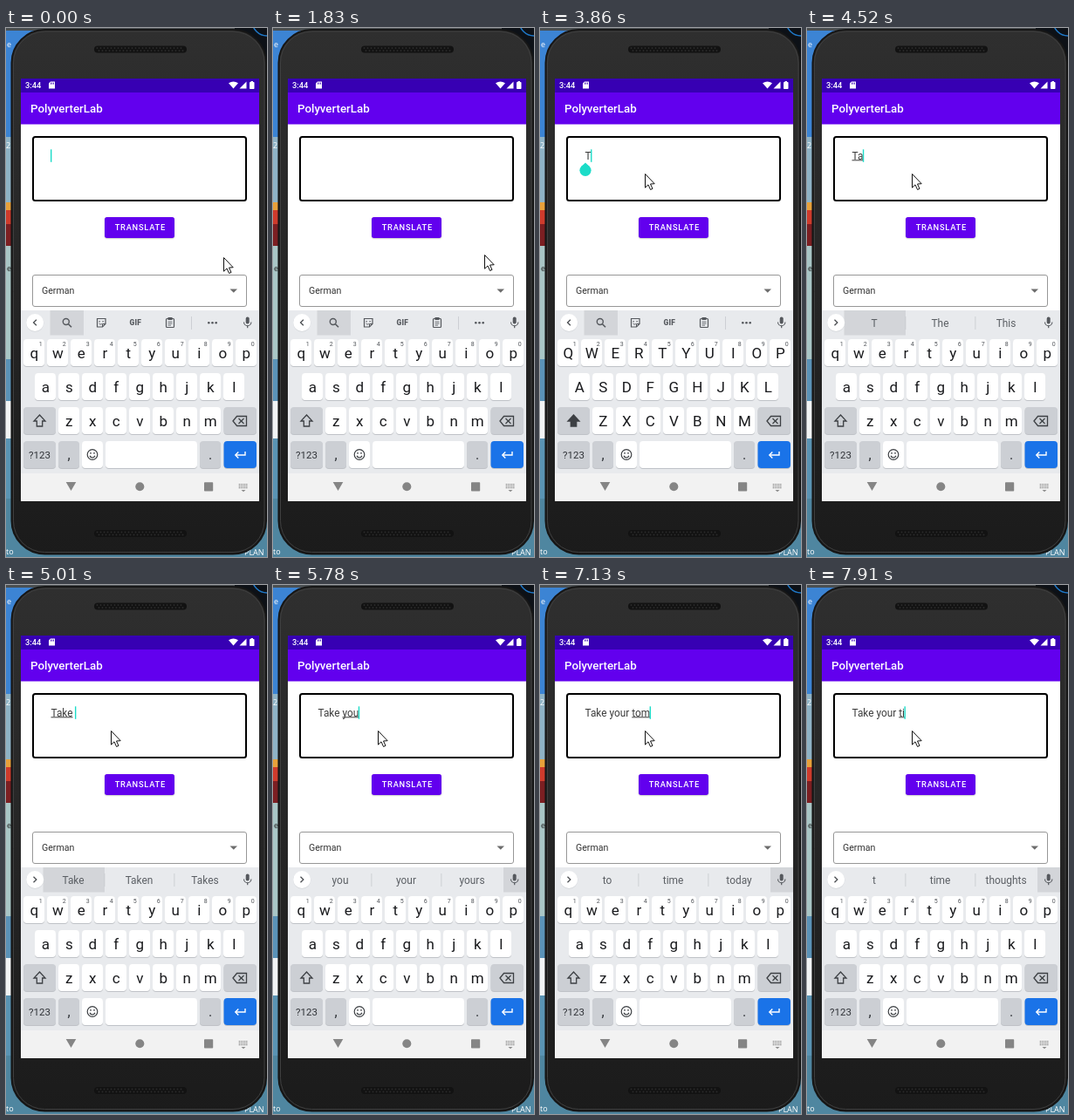
An HTML page with a canvas for the animation above (8 s loop, 299 px wide and 607 px high).

```html
<!DOCTYPE html>
<html lang="en">
<head>
<meta charset="utf-8">
<title>Typing on a phone</title>
<style>
html, body { margin: 0; width: 100%; height: 100%; overflow: hidden; background: #242424; }
canvas { display: block; width: 299px; height: 607px; }
</style>
</head>
<body>
<canvas id="stage"></canvas>
<script>
const W = 299, H = 607, LOOP = 8000;
const canvas = document.getElementById('stage');
const ctx = canvas.getContext('2d');
const dpr = window.devicePixelRatio || 1;
canvas.width = W * dpr;
canvas.height = H * dpr;

const TEAL = '#1cdcc8', PURPLE = '#6200ee', ICON = '#55585d', PRESSED = '#d3d5d9';
const INPUT_FONT = '11.85px Roboto, sans-serif';

// Timelines: each entry holds from its time until the next one.
const typed = [
  [0, ''], [3860, 'T'], [4520, 'Ta'], [4770, 'Tak'], [4890, 'Take'], [5010, 'Take '],
  [5260, 'Take y'], [5380, 'Take yo'], [5500, 'Take you'], [6280, 'Take your'],
  [6400, 'Take your '], [6770, 'Take your t'], [6890, 'Take your to'],
  [7010, 'Take your tom'], [7280, 'Take your to'], [7400, 'Take your t'], [7910, 'Take your ti']
];
const composing = [
  [0, ''], [4000, 'T'], [4520, 'Ta'], [4770, 'Tak'], [4890, 'Take'], [5260, ''],
  [5780, 'you'], [6400, 'your'], [6770, ''], [7130, 'tom'], [7280, 'to'], [7400, 't'], [7910, 'ti']
];
const hints = [
  [0, ''], [4120, 'T The This'], [4890, 'Take Taken Takes'], [5380, 'y you your'],
  [5780, 'you your yours'], [6400, "your you're yours"], [6890, 't time to'],
  [7130, 'to time today'], [7520, 't time thoughts']
];
const pointer = [
  [0, [249, 263]], [1830, [242, 260]], [1950, [215, 244]], [2070, [187, 222]],
  [2210, [158, 198]], [2330, [138, 181]], [2450, [124, 170]], [2570, [120, 167]]
];
const caretFlips = [370, 900, 1430, 2070, 2570, 2820, 3350, 3470];

function at(list, t) {
  let value = list[0][1];
  for (const [start, v] of list) if (t >= start) value = v;
  return value;
}

function rect(x, y, w, h, color) {
  ctx.fillStyle = color;
  ctx.fillRect(x, y, w, h);
}

function round(x, y, w, h, r, fill, stroke, lw = 1) {
  ctx.beginPath();
  ctx.roundRect(x, y, w, h, r);
  if (fill) { ctx.fillStyle = fill; ctx.fill(); }
  if (stroke) { ctx.strokeStyle = stroke; ctx.lineWidth = lw; ctx.stroke(); }
}

function disc(x, y, r, fill, stroke, lw = 1) {
  ctx.beginPath();
  ctx.arc(x, y, r, 0, Math.PI * 2);
  if (fill) { ctx.fillStyle = fill; ctx.fill(); }
  if (stroke) { ctx.strokeStyle = stroke; ctx.lineWidth = lw; ctx.stroke(); }
}

function trace(points, close) {
  ctx.beginPath();
  points.forEach(([x, y], i) => i ? ctx.lineTo(x, y) : ctx.moveTo(x, y));
  if (close) ctx.closePath();
}

function poly(points, fill) {
  trace(points, true);
  ctx.fillStyle = fill;
  ctx.fill();
}

function line(points, color, lw = 1, close = false) {
  trace(points, close);
  ctx.strokeStyle = color;
  ctx.lineWidth = lw;
  ctx.stroke();
}

function text(str, x, y, font, color, align = 'left', spacing = 0) {
  ctx.font = font;
  ctx.fillStyle = color;
  ctx.textAlign = align;
  ctx.letterSpacing = spacing + 'px';
  ctx.fillText(str, x, y);
  ctx.letterSpacing = '0px';
}

const roboto = (size, weight = 400) => `${weight} ${size}px Roboto, sans-serif`;

function desktop() {
  rect(0, 0, W, H, '#4f86a0');
  const strip = [
    [0, 125, '#3c84d4'], [125, 75, '#8fb3c6'], [200, 9, '#e9a13a'],
    [209, 16, '#cf3b2c'], [225, 25, '#7c1f22'], [250, 130, '#a9c6c6'],
    [380, 48, '#5b93b8'], [428, 43, '#f2f4f5'], [471, 69, '#5a94b4']
  ];
  for (const [y, h, c] of strip) rect(0, y, 40, h, c);
  rect(0, 0, 262, 3, '#4a4f52');
  rect(262, 0, 37, 45, '#0d1117');
  ctx.beginPath();
  ctx.arc(299, -8, 17, Math.PI / 2, Math.PI);
  ctx.strokeStyle = '#1f78c8';
  ctx.lineWidth = 1.5;
  ctx.stroke();
  const label = '9px "Open Sans", sans-serif';
  text('e', 1, 22, label, '#fff');
  text('2', 0, 138, label, '#fff');
  text('e', 1, 279, label, '#222');
  text('to', 0, 604, label, '#fff');
  text('PLAN', 273, 605, label, '#fff');
}

function grille(y) {
  round(101, y, 106, 8, 4, '#121212');
  for (let r = 0; r < 2; r++)
    for (let i = 0; i < 25; i++) disc(104.5 + i * 4 + r * 2, y + 2.5 + r * 3, 1, '#2b2b2b');
}

function phone() {
  const shell = ctx.createLinearGradient(0, 0, 0, H);
  shell.addColorStop(0, '#2f2f2f');
  shell.addColorStop(1, '#1b1b1b');
  round(6.5, 2, 291.5, 601.5, 38, shell, '#161616', 2);
  round(8.5, 4, 287.5, 597.5, 36, null, '#3f3f3f', 1);
  grille(20.5);
  grille(576);
  rect(17, 58, 273, 485, '#fff');
}

function statusBar() {
  rect(17, 58, 273, 16, '#3700b3');
  rect(17, 74, 273, 36.5, PURPLE);
  text('3:44', 22, 69.3, roboto(9.3, 500), '#fff');
  poly([[51, 61.5], [56, 61.5], [56, 69.5], [49, 69.5], [49, 63.5]], '#fff');
  for (let i = 0; i < 3; i++) rect(51 + i * 1.6, 62.6, 0.8, 2, '#3700b3');
  ctx.beginPath();
  ctx.moveTo(260.5, 69.5);
  ctx.lineTo(255, 63.3);
  ctx.quadraticCurveTo(260.5, 59.8, 266, 63.3);
  ctx.fillStyle = '#fff';
  ctx.fill();
  poly([[267.5, 69.5], [275.5, 69.5], [275.5, 61.5]], '#fff');
  round(279, 62, 5.5, 8, 0.7, '#fff');
  rect(280.5, 61, 2.5, 1.2, '#fff');
  text('PolyverterLab', 28, 97.3, roboto(13.3, 500), '#fff');
}

function form() {
  round(31, 125, 244, 73, 2.5, '#fff', '#000', 2);
  ctx.shadowColor = 'rgba(0,0,0,.25)';
  ctx.shadowBlur = 1.5 * dpr;
  ctx.shadowOffsetY = 0.7 * dpr;
  round(113, 217, 80, 24, 2.7, PURPLE);
  ctx.shadowColor = 'transparent';
  ctx.shadowBlur = ctx.shadowOffsetY = 0;
  text('TRANSLATE', 124.7, 232.3, roboto(9.3, 500), '#fff', 'left', 0.75);
  round(30.5, 283.5, 245, 36, 2.5, '#fff', '#979797');
  text('German', 41, 305.2, roboto(10.6), '#333');
  poly([[256.5, 299.5], [265, 299.5], [260.8, 303.8]], '#6d6d6d');
}

function inputText(t) {
  const str = at(typed, t), word = at(composing, t), x = 51.5;
  text(str, x, 150.5, INPUT_FONT, '#3c3c3c');
  if (word) {
    const from = ctx.measureText(str.slice(0, str.lastIndexOf(word))).width;
    rect(x + from, 151.3, ctx.measureText(word).width, 1, '#3c3c3c');
  }
  const end = x + ctx.measureText(str).width;
  if (caretFlips.filter(f => t >= f).length % 2 === 0) rect(end - 0.5, 139.3, 1.4, 14.5, TEAL);
  if (t >= 3470 && t < 4000) {
    disc(52, 163.3, 6.6, TEAL);
    poly([[52, 154.5], [56.7, 159], [52, 164], [47.3, 159]], TEAL);
  }
}

function toolIcons() {
  rect(50.5, 324, 38.5, 28.5, PRESSED);
  disc(68.8, 337, 3.5, null, ICON, 1.4);
  line([[71.5, 339.7], [75, 343.3]], ICON, 1.6);
  line([[104.5, 333.5], [114, 333.5], [114, 339.5], [110.5, 343], [104.5, 343]], ICON, 1.2, true);
  line([[114, 339.5], [110.5, 339.5], [110.5, 343]], ICON);
  rect(106.5, 336, 1.2, 1.4, ICON);
  rect(110.5, 336, 1.2, 1.4, ICON);
  line([[106.5, 339], [108, 340.2], [109.8, 339.5]], ICON, 0.9);
  text('GIF', 148.3, 341.2, roboto(8.4, 900), ICON, 'center', 0.3);
  round(183.5, 333.5, 9, 10, 1, null, ICON, 1.2);
  rect(185.5, 332, 5, 3, ICON);
  for (let i = 0; i < 3; i++) rect(185.5, 336.7 + i * 2, i < 2 ? 5 : 3.5, 0.8, ICON);
  rect(212, 331, 0.8, 15, '#c6c9ce');
  for (let i = 0; i < 3; i++) disc(232.3 + i * 4.2, 338.3, 1.3, ICON);
}

function toolbar(t) {
  const words = at(hints, t);
  if (words) {
    if (t < 5260) rect(42.5, 324, 70.5, 28.5, PRESSED);
    else rect(264, 324, 26, 28.5, PRESSED);
    words.split(' ').forEach((w, i) =>
      text(w, [77, 152.5, 228][i], 342.7, roboto(11.9), '#5b5f64', 'center'));
    for (const x of [112.5, 192.5]) rect(x, 331, 0.8, 15, '#c6c9ce');
  } else {
    toolIcons();
  }
  disc(33.2, 338.6, 10.2, '#d4d7db');
  disc(33.2, 338, 10, '#fff');
  const d = words ? 1.7 : -1.7;
  line([[33.2 - d, 334.7], [33.2 + d, 338], [33.2 - d, 341.3]], '#45484c', 1.2);
  round(274.7, 331.5, 4, 8, 2, ICON);
  ctx.beginPath();
  ctx.arc(276.7, 337.5, 4.2, 0, Math.PI);
  ctx.strokeStyle = ICON;
  ctx.lineWidth = 1.1;
  ctx.stroke();
  rect(276.1, 341.5, 1.2, 2.7, ICON);
}

function key(x, y, w, fill = '#fff') {
  round(x, y + 1, w, 31, 4, '#bfc2c7');
  round(x, y, w, 31, 4, fill);
}

function keyRow(letters, first, y, upper) {
  [...letters].forEach((ch, i) => {
    const x = first + i * 27;
    key(x - 12, y, 24);
    text(upper ? ch.toUpperCase() : ch, x + 0.3, y + 21.8, roboto(17), '#1a1b1e', 'center');
  });
}

function keyboard(t) {
  const upper = t >= 3860 && t < 4000, grey = '#cccfd4', ink = '#3d4044';
  rect(17, 324, 273, 187.5, '#e8eaed');
  toolbar(t);
  keyRow('qwertyuiop', 32, 357, upper);
  for (let i = 0; i < 10; i++)
    text((i + 1) % 10, 39.7 + i * 27, 365, roboto(7), '#505459', 'center');
  keyRow('asdfghjkl', 45, 396, upper);
  keyRow('zxcvbnm', 72, 435, upper);

  key(20, 435, 37, grey);
  const shift = [[38.5, 444], [45, 451], [41.7, 451], [41.7, 457], [35.3, 457], [35.3, 451], [32, 451]];
  if (upper) poly(shift, ink);
  line(shift, ink, 1.3, true);

  key(249.5, 435, 37.5, grey);
  line([[260, 451], [264.5, 445.5], [275.5, 445.5], [275.5, 456.5], [264.5, 456.5]], ink, 1.3, true);
  line([[266.5, 448], [272.5, 454]], ink, 1.3);
  line([[272.5, 448], [266.5, 454]], ink, 1.3);

  key(20, 474, 37, grey);
  text('?123', 38.5, 493.8, roboto(11.5), '#303338', 'center');
  key(60, 474, 24, grey);
  text(',', 72, 495, roboto(16), '#303338', 'center');
  key(87, 474, 24);
  disc(99, 489.5, 5.8, null, ink, 1.2);
  disc(97, 487.8, 0.9, ink);
  disc(101, 487.8, 0.9, ink);
  ctx.beginPath();
  ctx.arc(99, 490, 3, 0.25, Math.PI - 0.25);
  ctx.stroke();
  key(114, 474, 105);
  key(222, 474, 24, grey);
  text('.', 234, 495, roboto(16), '#303338', 'center');
  key(249.5, 474, 37.5, '#1a73e8');
  line([[274, 486], [274, 490], [263, 490]], '#fff', 1.4);
  line([[266.3, 486.5], [262.8, 490], [266.3, 493.5]], '#fff', 1.4);
}

function navBar() {
  const c = '#858585', small = '#8c8c8c';
  rect(17, 511.5, 273, 31.5, '#f2f2f2');
  poly([[68.7, 521], [80.3, 521], [74.5, 531]], c);
  disc(153.3, 526.3, 5, c);
  round(227, 521.3, 10.2, 10.2, 0.8, c);
  for (let r = 0; r < 3; r++)
    for (let i = 0; i < 5; i++) rect(266.7 + i * 2.1, 523 + r * 2, 1.4, 1.2, small);
  poly([[269.5, 530], [274.5, 530], [272, 532.3]], small);
}

function mouse(t) {
  const [x, y] = at(pointer, t);
  ctx.save();
  ctx.translate(x, y);
  const arrow = [[0.5, 0.5], [0.5, 16.2], [4, 12.9], [6.6, 18.5], [9, 17.4], [6.5, 12], [11.2, 11.7]];
  poly(arrow, '#fff');
  line(arrow, '#111', 1, true);
  ctx.restore();
}

function draw(now) {
  const t = now % LOOP;
  ctx.setTransform(dpr, 0, 0, dpr, 0, 0);
  desktop();
  phone();
  statusBar();
  form();
  inputText(t);
  keyboard(t);
  navBar();
  mouse(t);
}

let start;
function tick(now) {
  if (start === undefined) start = now;
  draw(now - start);
  requestAnimationFrame(tick);
}
requestAnimationFrame(tick);
</script>
</body>
</html>
```
